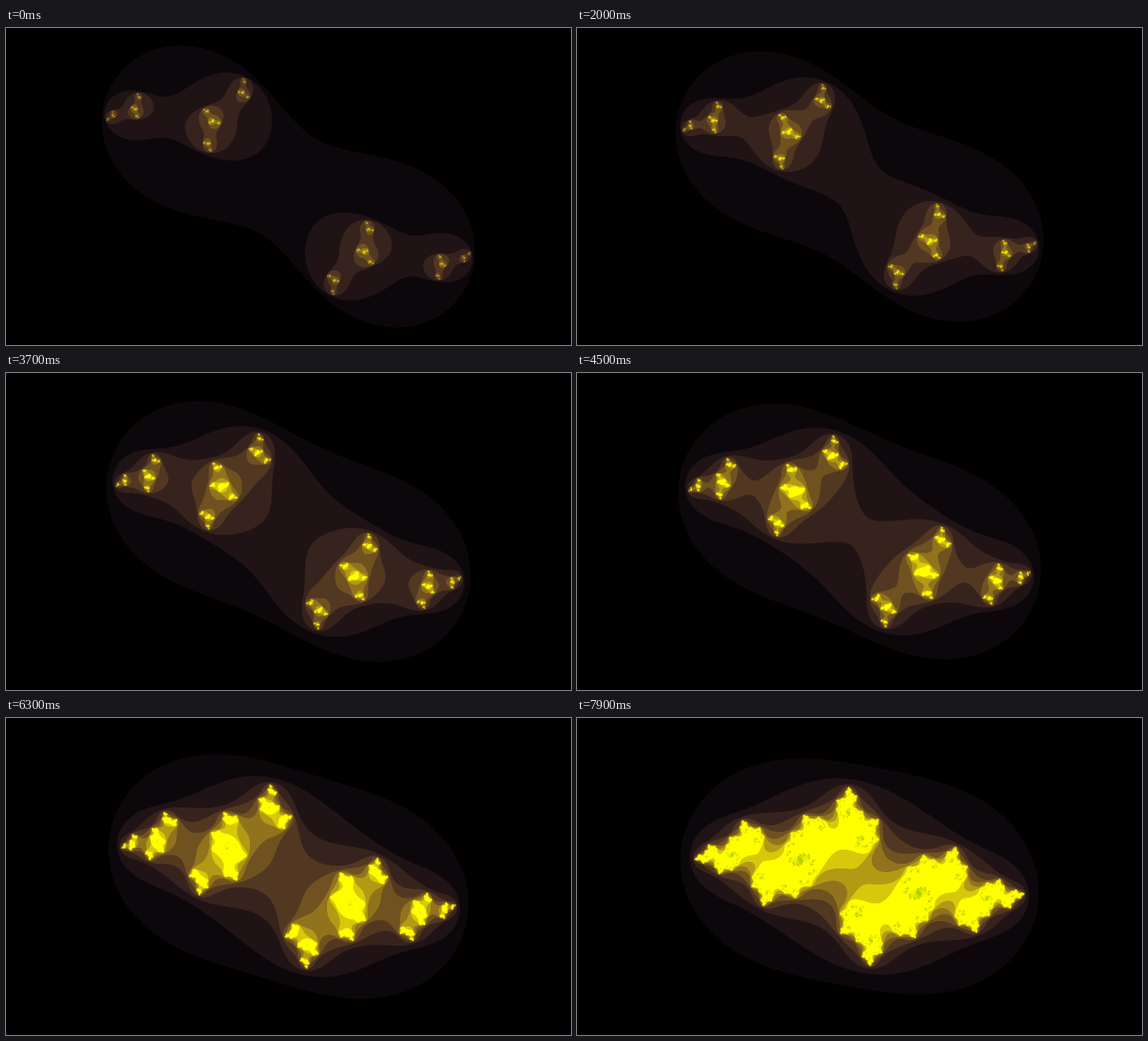
These frames come from a looping animation (600x337 px, 8 s). An HTML page with a canvas:

```html
<!DOCTYPE html>
<html lang="en">
<head>
<meta charset="utf-8">
<title>Julia set</title>
<style>
  html, body { margin: 0; width: 100%; height: 100%; overflow: hidden; background: #000; }
  canvas { display: block; width: 600px; height: 337px; }
</style>
</head>
<body>
<canvas id="stage" width="600" height="337"></canvas>
<script>
const W = 600, H = 337;
const SCALE = H / 3;          // the stage is three units high
const MAX_ITER = 32;
const FULL = 9;               // escape count that reaches pure yellow
const STEP = 100, STEPS = 80;
const C_RE = -0.85;
const SUB = [0.25, 0.75];     // 2 x 2 samples per pixel

const ctx = document.getElementById('stage').getContext('2d');
const image = ctx.createImageData(W, H);

// Black through brown and gold to yellow, then slowly towards olive
function colorAt(n) {
  const t = Math.min(n / FULL, 1);
  const olive = Math.min(Math.max(n - 17, 0) / 11, 1);
  const blue = 33 * Math.sin(Math.PI * t);
  return [
    255 * t ** 1.4 * (1 - 0.3 * olive),
    (255 * t ** 2.3 + blue / 2) * (1 - 0.22 * olive),
    blue
  ];
}

const palette = Array.from({ length: MAX_ITER + 1 }, (_, n) => colorAt(n));

// Number of steps of z -> z^2 + c that stay within radius 2
function escapeCount(x, y, cy) {
  let n = -1, xx = x * x, yy = y * y;
  while (xx + yy <= 4 && n < MAX_ITER) {
    y = 2 * x * y + cy;
    x = xx - yy + C_RE;
    xx = x * x;
    yy = y * y;
    n++;
  }
  return Math.max(n, 0);
}

function draw(step) {
  const cy = -1.505 + 0.0148 * step;
  const data = image.data;
  const last = W * H - 1;
  // The set is symmetric about the centre, so each pixel is set twice.
  for (let p = 0; p <= last / 2; p++) {
    const px = p % W - W / 2, py = Math.floor(p / W) - H / 2;
    let r = 0, g = 0, b = 0;
    for (const dy of SUB) for (const dx of SUB) {
      const c = palette[escapeCount((px + dx) / SCALE, (py + dy) / SCALE, cy)];
      r += c[0]; g += c[1]; b += c[2];
    }
    for (const q of [p * 4, (last - p) * 4]) {
      data[q] = r / 4;
      data[q + 1] = g / 4;
      data[q + 2] = b / 4;
      data[q + 3] = 255;
    }
  }
  ctx.putImageData(image, 0, 0);
}

const start = performance.now();
let shown = -1;

function tick() {
  const step = Math.floor((performance.now() - start) / STEP) % STEPS;
  if (step !== shown) draw(shown = step);
  requestAnimationFrame(tick);
}
tick();
</script>
</body>
</html>
```
